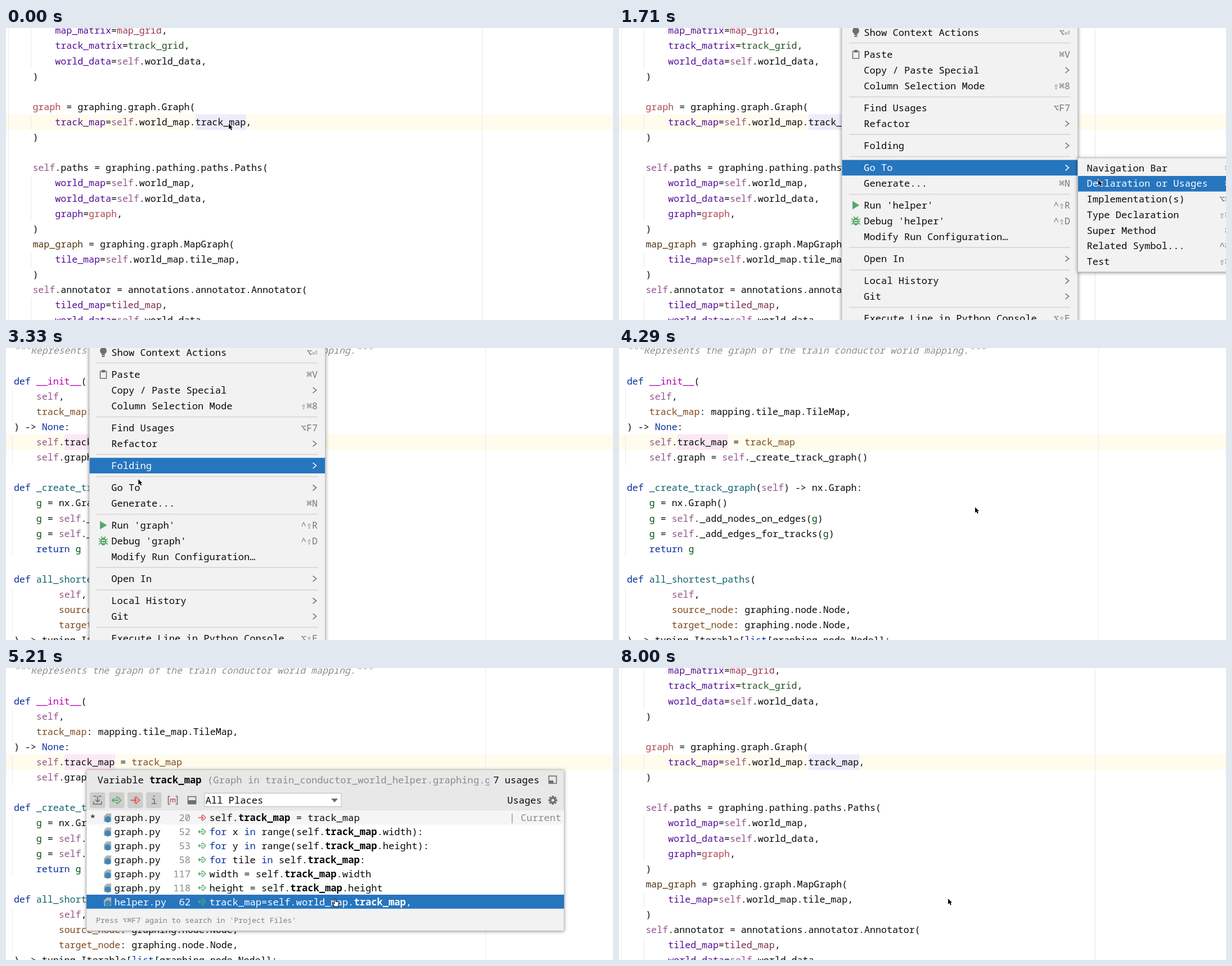
Recreate the animation shown at these times as an HTML page. Size 1079 px wide and 519 px high, loop 8.04 s.

```html
<!DOCTYPE html>
<html lang="en">
<head>
<meta charset="utf-8">
<title>Editor: go to declaration</title>
<style>
  html, body { margin: 0; width: 100%; height: 100%; overflow: hidden; background: #fff; }
  svg { display: block; width: 100vw; height: 100vh; }
  text { font: 17.08px "Noto Sans Mono", "DejaVu Sans Mono", monospace; white-space: pre; fill: #0a0a0a; }
  .code text { font-size: 16.62px; }
  #popup text { font-size: 17.14px; }
  .p { fill: #560a96; } .s { fill: #94558d; } .k { fill: #0a2fa0; }
  .c { fill: #9c3553; } .g { fill: #275427; } .r { fill: #ad4a50; } .b { fill: #4f3310; }
  .m { fill: #7a2d50; } .o { fill: #7d4a1c; } .f { fill: #10626f; } .d { fill: #b200b2; }
  .v { fill: #005417; } .i { fill: #8c8c8c; font-style: italic; }
  .w { font-weight: bold; } .t { fill: #8a8a8a; }
  text.key { font-size: 16.5px; fill: #777; text-anchor: end; }
  text.end { text-anchor: end; }
  #popup text.foot { font-size: 13.2px; fill: #808080; }
  .guide { stroke: #e9e9e9; }
  .sep { stroke: #d2d2d2; stroke-width: 1.4; }
  .panel { fill: #f2f2f2; stroke: #bcbcbc; stroke-width: .8; }
  .float { filter: drop-shadow(0 1px 3px #0007); }
  .bar { fill: none; }
  .on .bar { fill: #2675bf; }
  .on text, .on tspan { fill: #fff; }
  .line { fill: none; stroke: #6e6e6e; stroke-width: 1.6; }
  .on .chevron { stroke: #fff; }
  .green { stroke: #59a869; } .red { stroke: #e05555; }
</style>
</head>
<body>
<svg id="stage" viewBox="0 0 1079 519" preserveAspectRatio="none"></svg>
<script>
const LOOP = 8040, HOVER_LAG = 60;
const MENU_W = 419.5, PITCH = 27.11, USAGE_TOP = 253.3, USAGE_H = 24.93;

// ---- drawing helpers; ‹x text› colours a span with class x ----
const escapeText = s => s.replace(/&/g, '&amp;').replace(/</g, '&lt;').replace(/>/g, '&gt;');
const spans = s => escapeText(s).replace(/‹(\w) ([^›]*)›/g, '<tspan class="$1">$2</tspan>');
const text = (x, y, s, cls = '') => `<text x="${x}" y="${y + 5.5}" class="${cls}">${spans(s)}</text>`;
const rect = (x, y, w, h, attrs) => `<rect x="${x}" y="${y}" width="${w}" height="${h}" ${attrs}/>`;
const path = (d, attrs = 'class="line"') => `<path d="${d}" ${attrs}/>`;
const at = (x, y, body) => `<g transform="translate(${x} ${y})">${body}</g>`;
const group = (id, cls, body) => `<g id="${id}" class="${cls}">${body}</g>`;

// ---- editor pages; row 6 is the current line ----
const rowY = i => 167.5 + (i - 6) * PITCH;

function page(id, { left, margin, guides, mark, lines }) {
  const blocks = guides.map(([x, from, to]) =>
    path(`M${x} ${rowY(from - .5)}V${rowY(to + .5)}`, 'class="guide"')).join('');
  const rows = lines.map((s, i) => {
    const indent = s.search(/\S|$/);
    return s && text(left + indent * 9.972, rowY(i), s.trim());
  }).join('');
  return group(id, 'code',
    rect(0, 153.4, 1079, 27.6, 'fill="#fffcee"') + rect(mark[0], 153.4, 90, 27.6, `fill="${mark[1]}"`) +
    blocks + path(`M${margin} 0V519`, 'class="guide"') + rows);
}

const helperPage = {
  left: 47.4, margin: 846.5, mark: [337, '#edebfc'],
  guides: [[4.5, 0, 19], [44.5, 0, 2], [44.5, 6, 6], [44.5, 10, 12], [44.5, 15, 15], [44.5, 18, 19]],
  lines: [
    '    ‹p map_matrix›=‹c map_grid›,',
    '    ‹p track_matrix›=‹g track_grid›,',
    '    ‹p world_data›=‹s self›.world_data,',
    ')',
    '',
    '‹r graph› = graphing.graph.Graph(',
    '    ‹p track_map›=‹s self›.world_map.track_map,',
    ')',
    '',
    '‹s self›.paths = graphing.pathing.paths.Paths(',
    '    ‹p world_map›=‹s self›.world_map,',
    '    ‹p world_data›=‹s self›.world_data,',
    '    ‹p graph›=‹r graph›,',
    ')',
    '‹b map_graph› = graphing.graph.MapGraph(',
    '    ‹p tile_map›=‹s self›.world_map.tile_map,',
    ')',
    '‹s self›.annotator = annotations.annotator.Annotator(',
    '    ‹p tiled_map›=‹m tiled_map›,',
    '    ‹p world_data›=‹s self›.world_data,'
  ]
};

const graphPage = {
  left: 13.9, margin: 852.5, mark: [104, '#fce8f4'],
  guides: [[11.5, 3, 4], [11.5, 6, 7], [11.5, 10, 13], [11.5, 16, 18]],
  lines: [
    '‹i """Represents the graph of the train conductor world mapping."""›',
    '',
    '‹k def› ‹d __init__›(',
    '    ‹s self›,',
    '    ‹o track_map›: mapping.tile_map.TileMap,',
    ') -> ‹k None›:',
    '    ‹s self›.track_map = ‹o track_map›',
    '    ‹s self›.graph = ‹s self›._create_track_graph()',
    '',
    '‹k def› ‹f _create_track_graph›(‹s self›) -> nx.Graph:',
    '    ‹v g› = nx.Graph()',
    '    ‹v g› = ‹s self›._add_nodes_on_edges(‹v g›)',
    '    ‹v g› = ‹s self›._add_edges_for_tracks(‹v g›)',
    '    ‹k return› ‹v g›',
    '',
    '‹k def› ‹f all_shortest_paths›(',
    '        ‹s self›,',
    '        ‹o source_node›: graphing.node.Node,',
    '        ‹o target_node›: graphing.node.Node,',
    ') -> typing.Iterable[‹k list›[graphing.node.Node]]:'
  ]
};

// ---- context menu: [centre y, label, shortcut or '>', icon] ----
const icons = {
  bulb: '<circle cy="-3" r="6" fill="#6e6e6e"/>' + rect(-3, 3, 6, 2, 'fill="#6e6e6e"') + rect(-2.5, 6, 5, 2, 'fill="#6e6e6e"'),
  paste: path('M-5.5 -5.5H5.5V7H-5.5Z') + rect(-3, -8, 6, 4.5, 'fill="#6e6e6e"'),
  run: path('M-6 -7.5L6.5 0L-6 7.5Z', 'fill="#59a869"'),
  bug: path('M-8 -4L8 6M8 -4L-8 6M-8 1H8M-4 -8L-1 -4M4 -8L1 -4', 'class="line green"') +
    '<ellipse cy="1" rx="5" ry="7" fill="#59a869"/>' + path('M-3 -1H3M-3 3H3', 'stroke="#f2f2f2" stroke-width="1.3"')
};
const menuItems = file => [
  [8, 'Show Context Actions', '⌥⏎', 'bulb'],
  [47, 'Paste', '⌘V', 'paste'],
  [75, 'Copy / Paste Special', '>'],
  [103, 'Column Selection Mode', '⇧⌘8'],
  [142, 'Find Usages', '⌥F7'],
  [170, 'Refactor', '>'],
  [209, 'Folding', '>'],
  [248.3, 'Go To', '>'],
  [276, 'Generate...', '⌘N'],
  [315, `Run '${file}'`, '^⇧R', 'run'],
  [343, `Debug '${file}'`, '^⇧D', 'bug'],
  [371, 'Modify Run Configuration…', ''],
  [410, 'Open In', '>'],
  [449.3, 'Local History', '>'],
  [477, 'Git', '>'],
  [516, 'Execute Line in Python Console', '⌥⇧E']
];
const subItems = [
  ['Navigation Bar', '⌘↑'], ['Declaration or Usages', '⌘B'], ['Implementation(s)', '⌥⌘B'],
  ['Type Declaration', '⇧⌘B'], ['Super Method', '⌘U'], ['Related Symbol...', '^⌘↑'], ['Test', '⇧⌘T']
].map(([label, key], i) => [249 + i * 27.75, label, key]);

function menuRow([y, label, key, icon], textX, width) {
  const hint = key === '>'
    ? path(`M${width - 22} ${y - 5}l6 5l-6 5`, 'class="line chevron"')
    : text(width - 13.5, y, key, 'key');
  return `<g class="row">${rect(0.5, y - 13.8, width - 1, 27.7, 'class="bar"')}` +
    (icon ? at(25, y, icons[icon]) : '') + text(textX, y, label) + hint + '</g>';
}
function menu(id, left, file) {
  const seps = [26.5, 122.5, 189.3, 228.5, 295.5, 390, 430, 496.5]
    .map(y => path(`M13 ${y}H${MENU_W - 13.5}`, 'class="sep"')).join('');
  const main = rect(0, -40, MENU_W, 620, 'class="panel float"') + seps +
    menuItems(file).map(r => menuRow(r, 39.3, MENU_W)).join('');
  const sub = rect(0, 231, 295, 202.5, 'class="panel float"') +
    subItems.map(r => menuRow(r, 16, 295)).join('');
  return group(id, '', at(left, 0, `<g class="main">${main}</g>` +
    `<g class="sub" transform="translate(${MENU_W} 0)">${sub}</g>`));
}

// ---- usages popup ----
const usages = [
  ['graph.py', 20, 'self.‹w track_map› = track_map'],
  ['graph.py', 52, '‹k for› x ‹k in› range(self.‹w track_map›.width):'],
  ['graph.py', 53, '‹k for› y ‹k in› range(self.‹w track_map›.height):'],
  ['graph.py', 58, '‹k for› tile ‹k in› self.‹w track_map›:'],
  ['graph.py', 117, 'width = self.‹w track_map›.width'],
  ['graph.py', 118, 'height = self.‹w track_map›.height'],
  ['helper.py', 62, 'track_map=self.world_map.‹w track_map›,']
];
const diamond = 'M-1.5 -2.5L1.5 -5.5L7 0L1.5 5.5L-1.5 2.5';
const readArrow = path(diamond + 'M3 0H-7M-4 -3L-7 0L-4 3', 'class="line green"');
const writeArrow = path(diamond + 'M-7.5 0H2M-1 -3L2 0L-1 3', 'class="line red"');

function usageRow([file, number, code], i) {
  const top = USAGE_TOP + i * USAGE_H, y = top + 13.2;
  return '<g class="row">' +
    (i ? '' : rect(143, top, 849, USAGE_H, 'fill="#f5f5f5"')) +
    rect(143, top, 849, USAGE_H, 'class="bar"') +
    (i ? '' : text(149, y + 1, '*') + text(987, y, '| Current', 't end')) +
    path(`M174 ${y - 3}l5 -5h8v15h-13z`, 'fill="#a9b2b9"') +
    `<circle cx="181" cy="${y + 2.5}" r="5.5" fill="#3f86b8"/>` +
    text(192.5, y, file) + text(328, y, String(number), 't end') +
    at(348.5, y - .5, `<g transform="scale(.9)">${i ? readArrow : writeArrow}</g>`) + text(361.5, y, code) + '</g>';
}
function popup() {
  const buttons = [149, 183, 216, 249].map(x => rect(x, 221, 27.5, 28, 'rx="3.5" fill="#cdcdcd"')).join('');
  const teeth = [0, 45, 90, 135].map(a => `<path d="M0 -8V8" transform="rotate(${a})" stroke="#6e6e6e" stroke-width="3.4"/>`).join('');
  return group('popup', '',
    rect(143, 181, 849, 286, 'fill="#fff" class="float"') +
    rect(143, 181, 849, 73, 'fill="#e8e8e8"') + rect(143, 428, 849, 39, 'fill="#f2f2f2"') +
    rect(143, 181, 849, 286, 'fill="none" stroke="#bcbcbc" stroke-width=".7"') +
    '<clipPath id="titleClip"><rect x="143" y="181" width="716" height="40"/></clipPath>' +
    `<g clip-path="url(#titleClip)">${text(162.5, 199, 'Variable ‹w track_map›')}` +
    text(358, 199, '(Graph in train_conductor_world_helper.graphing.graph)', 't') + '</g>' +
    text(866, 199, '7 usages') +
    rect(965, 192, 13.5, 13, 'class="line"') + rect(965, 200, 8, 5, 'fill="#6e6e6e"') +
    buttons +
    at(162.7, 235, path('M-7 -7H-2M2 -7H7M0 -7V3M-4 -1L0 3L4 -1M-7 2V7H7V2')) +
    at(196.5, 235, `<g transform="scale(1.1)">${readArrow}</g>`) +
    at(229.5, 235, `<g transform="scale(1.1)">${writeArrow}</g>`) +
    at(262.7, 235, path('M-3 -2H1V6M-4 6H5M-1 -7H2', 'class="line" stroke-width="2"')) +
    at(296.5, 235, path('M-5 -7H-8V7H-5M5 -7H8V7H5') + path('M-4 4V-2H4V4M0 -2V4', 'class="line red"')) +
    rect(323.5, 228.5, 14, 13, 'class="line"') + rect(323, 235, 15, 7, 'fill="#6e6e6e"') +
    rect(353, 222.5, 243, 24, 'fill="#fff" stroke="#b5b5b5"') + text(354.5, 235, 'All Places') +
    path('M578 232H590L584 239Z', 'fill="#6e6e6e"') +
    text(891, 235, 'Usages') + at(972, 235, teeth + '<circle r="4" fill="#e8e8e8" stroke="#6e6e6e" stroke-width="3"/>') +
    usages.map(usageRow).join('') +
    text(160, 447, "Press ⌥⌘F7 again to search in 'Project Files'", 'foot'));
}

const pointer =
  group('arrow', '', path('M0 0V9.8L2.3 7.8L4 11.4L5.8 10.6L4.2 7H7Z', 'fill="#000" stroke="#fff" stroke-width="1.4" paint-order="stroke"')) +
  group('hand', '', path('M-1.2 1Q0 -.6 1.2 1V5Q6.5 5 6.5 8Q6.5 11 5 14H-1L-4.5 8.5Q-4 6.5 -1.2 9Z', 'fill="#fff" stroke="#111" stroke-width="1.1"'));

const $ = s => document.querySelector(s);
const stage = $('#stage');
stage.innerHTML = page('helper', helperPage) + page('graph', graphPage) +
  menu('menuA', 396, 'helper') + menu('menuB', 148, 'graph') + popup() + group('cursor', '', pointer);

// ---- timeline ----
const track = [ // ms, x, y of the pointer tip
  [0, 396, 170], [710, 396, 170], [850, 480, 246], [1100, 520, 250], [1350, 800, 250],
  [1480, 852, 270], [1900, 852, 270], [2300, 420, 200], [2700, 148, 170], [3200, 148, 170],
  [3330, 235, 233], [3460, 270, 250], [3750, 270, 250], [3950, 580, 256], [4080, 633, 283],
  [4680, 633, 283], [4920, 609, 338], [5140, 585, 410], [LOOP, 585, 410]
];
const menus = [
  { id: '#menuA', left: 396, open: 40, hover: 760, sub: 1050, close: 1790 },
  { id: '#menuB', left: 148, open: 2950, hover: 3230, sub: 3500, close: 4120 }
];
const PAGE_SWAP = 1800, POPUP_OPEN = 4420, POPUP_HOVER = 4680, POPUP_CLOSE = 5490;

function tipAt(t) {
  const i = Math.max(1, track.findIndex(p => p[0] >= t));
  const [t0, x0, y0] = track[i - 1], [t1, x1, y1] = track[i];
  const k = (t - t0) / (t1 - t0);
  return [x0 + (x1 - x0) * k, y0 + (y1 - y0) * k];
}
const show = (el, on) => { el.style.display = on ? '' : 'none'; };
const select = (rows, index) => rows.forEach((r, i) => r.classList.toggle('on', i === index));
const rowTops = menuItems('').map(r => r[0] - 13.8);
for (const m of menus) {
  m.el = $(m.id);
  m.subEl = m.el.querySelector('.sub');
  m.rows = m.el.querySelectorAll('.main .row');
  m.subRows = m.subEl.querySelectorAll('.row');
}
const usageRows = document.querySelectorAll('#popup .row');
const [helperEl, graphEl, popupEl, cursorEl, arrowEl, handEl] =
  ['#helper', '#graph', '#popup', '#cursor', '#arrow', '#hand'].map($);

function render(t) {
  const [x, y] = tipAt(t), [hx, hy] = tipAt(Math.max(0, t - HOVER_LAG));
  const inGraph = t >= PAGE_SWAP && t < POPUP_CLOSE;
  show(helperEl, !inGraph);
  show(graphEl, inGraph);

  for (const m of menus) {
    const subLeft = m.left + MENU_W;
    show(m.el, t >= m.open && t < m.close);
    show(m.subEl, t >= m.sub);
    const hovered = hx > subLeft ? 7 : rowTops.filter(top => top <= hy).length - 1;
    select(m.rows, t < m.hover ? -1 : hovered);
    select(m.subRows, hx > subLeft ? Math.floor((hy - 235) / 27.75) : -1);
  }

  show(popupEl, t >= POPUP_OPEN && t < POPUP_CLOSE);
  select(usageRows, t < POPUP_HOVER ? 1 : Math.floor((hy - USAGE_TOP) / USAGE_H));

  const overList = t >= POPUP_HOVER && t < POPUP_CLOSE;
  show(handEl, overList);
  show(arrowEl, !overList);
  cursorEl.setAttribute('transform', `translate(${x.toFixed(2)} ${y.toFixed(2)})`);
}

const start = performance.now();
function tick() {
  render((performance.now() - start) % LOOP);
  requestAnimationFrame(tick);
}
tick();
</script>
</body>
</html>
```
